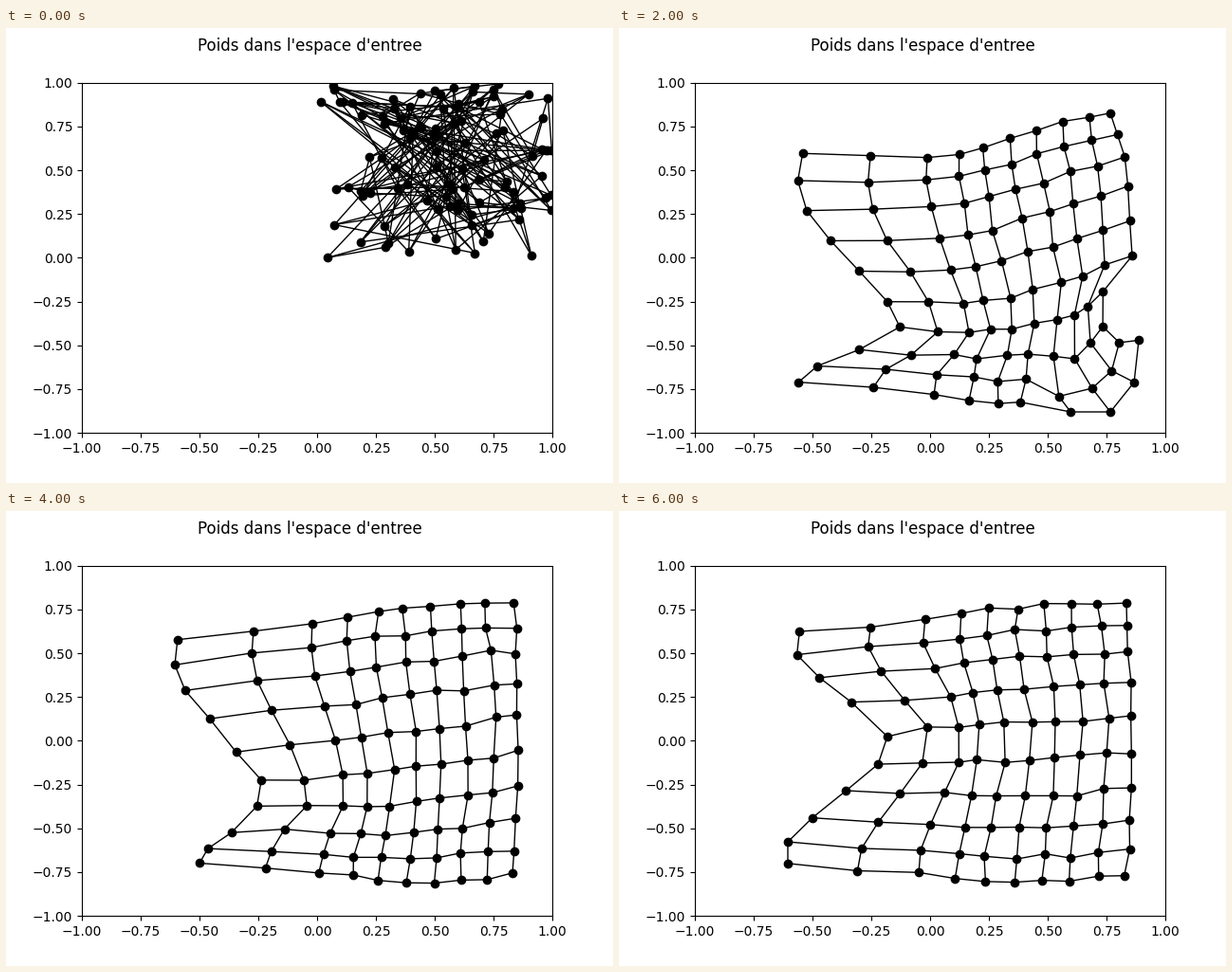
A matplotlib script for the animation above (6.2 s loop, 640 by 480 pixels).

```python
import numpy as np
import matplotlib.pyplot as plt
from matplotlib.animation import FuncAnimation

FRAMES, STEP, SIZE = 31, 200, 10
SETTLED, UNFOLDED = 7, 13             # frames where the map gets tidy, then flat
I, J = np.mgrid[0:SIZE, 0:SIZE].astype(float)
T = J / (SIZE - 1)
S = I / (SIZE - 1) - 0.033 * np.sin(2 * np.pi * I / (SIZE - 1))

# Key points of the open left side, in stage pixels
KEYS = [7, 13, 17, 22, 26, 30]
NOTCH_ROW = [6, 5.7, 5.9, 5.1, 5, 4.3]
NOTCH_X = [306, 293, 284, 271, 280, 288]
TOP_X = [208, 170, 154, 194, 195, 186]
TOP_Y = [125, 145, 145, 127, 123, 130]
LOW_X = [193, 189, 218, 194, 166, 170]


def lerp(a, b, t):
    return a + (b - a) * t


def columns(notch_row, notch_x, top_x, low_x, fold):
    """x of every node: two arms on the left, even columns on the right."""
    up = np.clip((notch_row - I) / notch_row, 0, 1)
    down = np.clip((I - notch_row) / (SIZE - 1 - notch_row), 0, 1)
    reach = ((notch_x - top_x) * np.sin(1.15 * np.pi / 2 * up) ** 1.4
             + (notch_x - low_x) * np.sin(np.pi / 2 * down) ** 1.4)
    left = notch_x - reach
    inner = 382 - 0.22 * reach + 22 * fold * S
    right = 541 - 6 * (2 * S - 1) ** 2 - 30 * fold * (1 - S) ** 3
    arm = 1 - np.clip(1 - J / 3, 0, 1) ** 1.4
    return np.where(J < 3, lerp(left, inner, arm),
                    lerp(inner, right, (J - 3) / 6))


def rows(notch_row, top_y, fold):
    """y of every node, between a curved top and a curved bottom."""
    arch = np.sin(np.pi * T)
    top = (lerp(top_y, 98 - 14 * fold, T ** 0.75) + (41 * fold - 8) * arch
           + 12 * fold * np.sin(2 * np.pi * T))
    bottom = lerp(371, 384, T) + (14 + 8 * fold) * arch
    sag = lerp(14 * (notch_row - 4.3), -6 - 18 * fold, T)
    return lerp(top, bottom, S) + sag * np.sin(np.pi * S)


def curl(x, y, fold, px=515, py=352):
    """Twist the lower right corner around a pivot."""
    gap = np.hypot(SIZE - 1 - I, SIZE - 1 - J)
    angle = np.pi * fold * np.clip(1 - gap / 4, 0, 1)
    c, s = np.cos(angle), np.sin(angle)
    dx, dy = x - px, y - py
    return px + dx * c + dy * s, py - dx * s + dy * c


def crumple(size):
    """Smooth random waves over the map."""
    rng = np.random.default_rng(4)
    waves = np.zeros((2, SIZE, SIZE))
    for _ in range(3):
        a, b = rng.uniform(0.3, 0.8, 2)
        phase = rng.uniform(0, 2 * np.pi, (2, 1, 1))
        waves += size * np.sin(a * I + b * J + phase)
    return waves


def weights(n):
    rng = np.random.default_rng(100 + n)
    if n == 0:
        return rng.random((2, SIZE, SIZE))
    row, notch, top_x, top_y, low_x = (
        np.interp(n, KEYS, v)
        for v in (NOTCH_ROW, NOTCH_X, TOP_X, TOP_Y, LOW_X))
    t = np.clip((n - SETTLED) / (UNFOLDED - SETTLED), 0, 1)
    fold = 1 - t * t * (3 - 2 * t)
    net = np.array(curl(columns(row, notch, top_x, low_x, fold),
                        rows(row, top_y, fold), fold))
    mess = max(0, SETTLED - n) / (SETTLED - 1)
    x, y = net + mess * crumple(14) + rng.normal(0, 1.5, net.shape)
    return (x.clip(178, 548) - 328) / 248, (242.4 - y.clip(76, 405)) / 184.8


fig, ax = plt.subplots(figsize=(6.4, 4.8), dpi=100)
fig.suptitle("Poids dans l'espace d'entree")
ax.set(xlim=(-1, 1), ylim=(-1, 1))
X, Y = weights(0)
lines = ax.plot(X, Y, "k", X.T, Y.T, "k", lw=1)
dots, = ax.plot(X.ravel(), Y.ravel(), "ko", ms=6)


def update(n):
    x, y = weights(n)
    for line, px, py in zip(lines, [*x.T, *x], [*y.T, *y]):
        line.set_data(px, py)
    dots.set_data(x.ravel(), y.ravel())
    return [*lines, dots]


anim = FuncAnimation(fig, update, frames=FRAMES, interval=STEP,
                     repeat=True, repeat_delay=0, blit=False)
plt.show()
```
